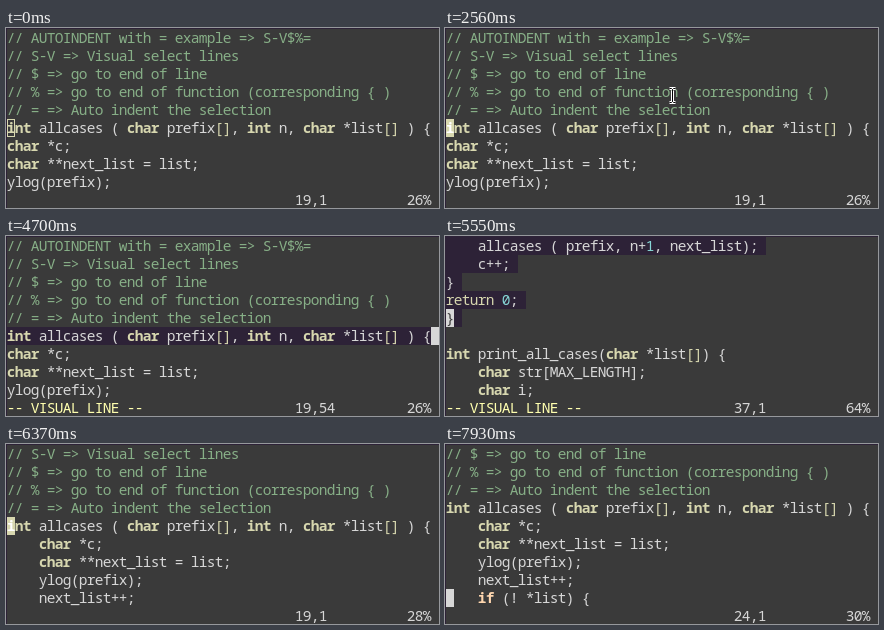
An HTML page with a canvas for the animation above (8000 ms loop, 433x180 px).

```html
<!DOCTYPE html>
<html lang="en">
<head>
<meta charset="utf-8">
<title>Auto indent in Vim</title>
<style>
html, body { margin: 0; width: 100%; height: 100%; overflow: hidden; background: #2d2237; }
canvas { display: block; }
</style>
</head>
<body>
<canvas id="stage" width="433" height="180"></canvas>
<script>
const ctx = document.getElementById('stage').getContext('2d');
const LOOP = 8000, CELL = 8, ROW = 18, PAD = 1, SIZE = 14.5;
const SPACING = CELL - SIZE * .6; // brings the glyph advance onto the cell grid
const BG = '#3a3a3a', DARK = '#2d2237', TEXT = '#d7d7d7', COMMENT = '#87af87',
  TYPE = '#d7d7af', KEYWORD = '#ffd7af', NUMBER = '#87d7d7', MODE = '#ffffaf';

const buffer = {
  14: '// AUTOINDENT with = example => S-V$%=',
  15: '// S-V => Visual select lines',
  16: '// $ => go to end of line',
  17: '// % => go to end of function (corresponding { )',
  18: '// = => Auto indent the selection',
  19: 'int allcases ( char prefix[], int n, char *list[] ) {',
  20: 'char *c;',
  21: 'char **next_list = list;',
  22: 'ylog(prefix);',
  23: 'next_list++;',
  24: 'if (! *list) {',
  33: '    allcases ( prefix, n+1, next_list);',
  34: '    c++;',
  35: '}',
  36: 'return 0;',
  37: '}',
  38: '',
  39: 'int print_all_cases(char *list[]) {',
  40: '    char str[MAX_LENGTH];',
  41: '    char i;'
};

// Each view: start, top line, cursor line, cursor column, visual mode, scroll position
const views = [
  [0, 14, 19, 1, false, '26%'],
  [3800, 14, 19, 1, true, '26%'],
  [4700, 14, 19, 54, true, '26%'],
  [5550, 33, 37, 1, true, '64%'],
  [6370, 15, 19, 1, false, '28%'],
  [7210, 15, 20, 1, false, '28%'],
  [7370, 15, 21, 1, false, '28%'],
  [7540, 15, 22, 1, false, '28%'],
  [7720, 15, 23, 1, false, '28%'],
  [7930, 16, 24, 1, false, '30%']
];
const INDENTED = 6370;
const hidden = [[770, 1370], [1970, 2560], [3460, 4700], [6060, 6370], [6900, 7210]];
const within = (t, [from, to]) => t >= from && t < to;

const cellX = col => PAD + col * CELL;
const rowY = row => PAD + row * ROW;

function fill(col, row, cells, color) {
  ctx.fillStyle = color;
  ctx.fillRect(cellX(col), rowY(row), cells * CELL, ROW);
}

function write(text, col, row, color, bold) {
  ctx.font = `${bold ? 'bold ' : ''}${SIZE}px "Noto Sans Mono", monospace`;
  ctx.letterSpacing = SPACING + 'px';
  ctx.fillStyle = color;
  ctx.fillText(text, cellX(col) + SPACING / 2, rowY(row) + 14);
}

function writeCode(text, row) {
  if (text.startsWith('//')) return write(text, 0, row, COMMENT);
  for (const { 0: word, index } of text.matchAll(/\w+|\[\]|[^\w\s]/g)) {
    if (/^(int|char)$/.test(word)) write(word, index, row, TYPE, true);
    else if (word === 'if') write(word, index, row, KEYWORD, true);
    else if (/^(return|\[\])$/.test(word)) write(word, index, row, TYPE);
    else if (/^\d+$/.test(word)) write(word, index, row, NUMBER);
    else write(word, index, row, TEXT);
  }
}

function drawCursor(char, col, row, hollow) {
  const onType = char === 'i';
  if (hollow) {
    ctx.strokeStyle = TYPE;
    ctx.strokeRect(cellX(col) + .5, rowY(row) + .5, CELL - 1, ROW - 1);
    return;
  }
  fill(col, row, 1, onType ? TYPE : TEXT);
  write(char, col, row, onType ? '#fff' : BG, onType);
}

function drawPointer(x, y) {
  const beam = new Path2D(`M${x - 3} ${y - 7}h2l1 1l1 -1h2M${x} ${y - 6}v12M${x - 3} ${y + 7}h2l1 -1l1 1h2`);
  for (const [color, width] of [['#fff', 3], ['#000', 1]]) {
    ctx.strokeStyle = color;
    ctx.lineWidth = width;
    ctx.stroke(beam);
  }
  ctx.lineWidth = 1;
}

function draw(t) {
  const [, top, line, column, visual, percent] = views.findLast(v => v[0] <= t);
  const lineText = n => t >= INDENTED && n > 19 ? '    ' + buffer[n] : buffer[n];
  const col = column - 1, row = line - top;

  ctx.fillStyle = DARK;
  ctx.fillRect(0, 0, 433, 180);
  ctx.fillStyle = BG;
  ctx.fillRect(PAD, PAD, 432, 179);
  for (let r = 0; r < 9; r++) {
    const n = top + r, text = lineText(n);
    if (visual && n >= 19 && n <= line) fill(0, r, text.length + 1, DARK);
    // Vim leaves the cell under the cursor unselected
    if (visual && n === line) fill(col, r, 1, BG);
    writeCode(text, r);
  }
  if (visual) write('-- VISUAL LINE --', 0, 9, MODE);
  write(`${line},${column}`, 36, 9, TEXT);
  write(percent, 50, 9, TEXT);

  if (!hidden.some(span => within(t, span)))
    drawCursor(lineText(line)[col] || ' ', col, row, t < 220);
  if (within(t, [220, 3750])) drawPointer(227.5, 67.5);
}

function tick(now) {
  draw(now % LOOP);
  requestAnimationFrame(tick);
}
requestAnimationFrame(tick);
</script>
</body>
</html>
```
